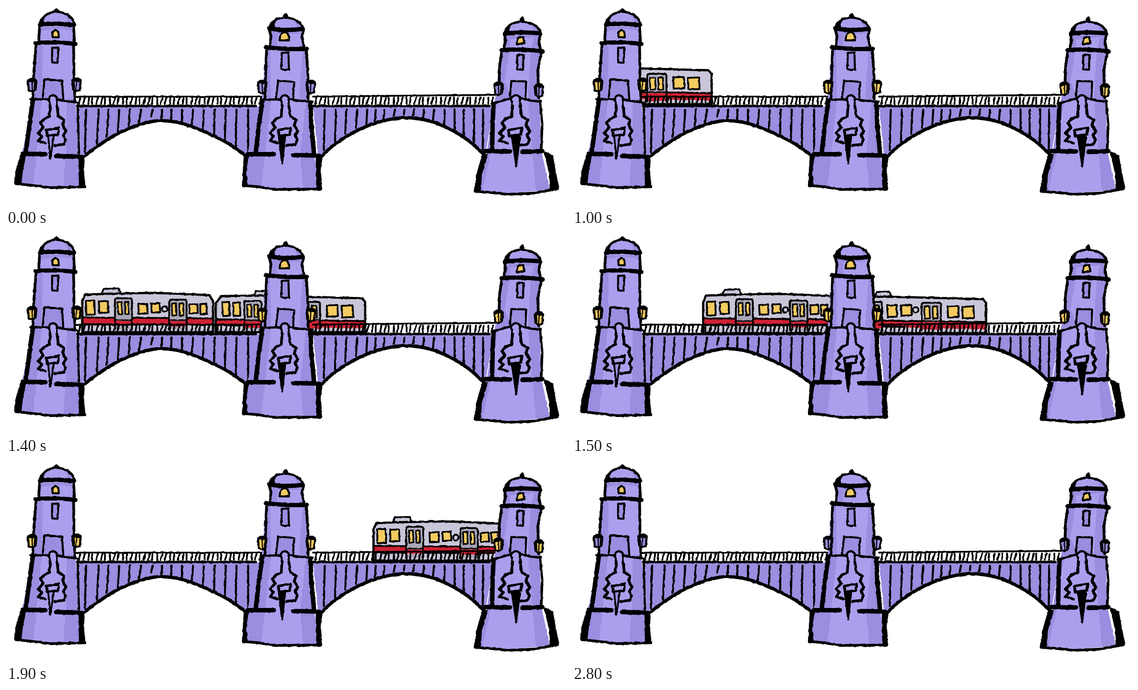
Write an HTML page that moves like this. It is 1251 px wide and 448 px high and loops after 3.4 s.

```html
<!DOCTYPE html>
<html lang="en">
<head>
<meta charset="utf-8">
<title>Train over a bridge</title>
<style>
html, body { margin: 0; width: 100%; height: 100%; overflow: hidden; background: #fff; }
svg { display: block; width: 100%; height: 100%; }
.ink { fill: none; stroke: #000; stroke-width: 5; stroke-linecap: round; stroke-linejoin: round; }
.train { animation: ride 3400ms step-end infinite; }
.glow { fill: #9b8ddf; animation: 3400ms step-end infinite; }
.t0 { animation-name: lamp0; }
.t1 { animation-name: lamp1; }
.t2 { animation-name: lamp2; }
@keyframes lamp0 { 5.88% { fill: #f4cb60; } 70.58% { fill: #9b8ddf; } }
@keyframes lamp1 { 11.76% { fill: #f4cb60; } 76.47% { fill: #9b8ddf; } }
@keyframes lamp2 { 17.64% { fill: #f4cb60; } 82.35% { fill: #9b8ddf; } }
@keyframes ride {
  0% { transform: translate(-1400px, 0); }
  29.41% { transform: translate(-613px, -2px); animation-timing-function: steps(5); }
  44.1% { transform: translate(0, -2px); }
  44.11% { transform: translate(0, 0); animation-timing-function: steps(2); }
  49.99% { transform: translate(278px, -2px); animation-timing-function: steps(4); }
  61.76% { transform: translate(778px, 0); }
  64.7%, 100% { transform: translate(1400px, 0); }
}
</style>
</head>
<body>
<svg viewBox="0 0 1251 448" preserveAspectRatio="none">
  <defs>
    <filter id="rough" filterUnits="userSpaceOnUse" x="0" y="0" width="1251" height="448" color-interpolation-filters="sRGB">
      <feTurbulence type="fractalNoise" baseFrequency=".11" numOctaves="2" seed="4"/>
      <feColorMatrix values="1 0 0 0 0  0 1 0 0 0  0 0 1 0 0  0 0 0 0 1" result="noise"/>
      <feDisplacementMap in="SourceGraphic" in2="noise" scale="3.5" xChannelSelector="R" yChannelSelector="G"/>
    </filter>
    <clipPath id="span"><path d="M110 100H1150V230H110Z"/></clipPath>
  </defs>
  <g filter="url(#rough)"><g clip-path="url(#span)"><g class="train" id="train"></g></g></g>
  <g filter="url(#rough)" id="bridge"></g>
</svg>
<script>
const LIGHT = '#ab9fed', DARK = '#9b8ddf', GOLD = '#f4cb60';
const GREY = '#cac6d9', DOOR = '#a9a5b6', RED = '#cf2134';

const fill = (d, color) => `<path d="${d}" fill="${color}"/>`;
const ink = (d, width = 5, color = 'none') =>
  `<path class="ink" d="${d}" style="stroke-width:${width};fill:${color}"/>`;
const box = (x1, y1, x2, y2, color, width = 4) =>
  ink(`M${x1} ${y1 + 1}L${x2 - 1} ${y1}L${x2} ${y2 - 1}L${x1 + 1} ${y2}Z`, width, color);

// ---- train ----
function door(x, y, width) {
  const mid = x + width / 2;
  return ink(`M${x} 216V${y + 5}Q${x} ${y} ${x + 5} ${y}H${x + width - 5}Q${x + width} ${y} ${x + width} ${y + 5}V216`, 4, DOOR)
    + fill(`M${x + 2} 197H${x + width - 2}V${y + 60}H${x + 2}Z`, RED)
    + ink(`M${x} 195H${x + width}`, 3)
    + box(x + 6, y + 8, mid - 3, y + 36, GOLD, 3.5)
    + box(mid + 3, y + 8, x + width - 7, y + 36, GOLD, 3.5);
}

function car({ outline, roofBox, stripe, lines, windows, doors, port }) {
  return ink(roofBox, 4, GREY) + fill(outline, GREY) + fill(stripe, RED)
    + ink(lines, 4) + ink(outline, 5)
    + doors.map(d => door(...d)).join('')
    + windows.map(w => box(...w, GOLD)).join('')
    + `<circle class="ink" cx="${port}" cy="170" r="6" style="stroke-width:4;fill:${GREY}"/>`;
}

document.getElementById('train').innerHTML = car({
  outline: 'M293 222V152L299 138L345 136L440 134L490 135L577 139L585 152V222Z',
  roofBox: 'M335 136L341 125L374 124L379 136Z',
  stripe: 'M294 190L584 192V204L294 202Z',
  lines: 'M294 189L584 191M294 204L584 205',
  windows: [[301, 151, 321, 183], [330, 152, 351, 179], [418, 158, 439, 181],
    [447, 157, 467, 178], [532, 159, 551, 180], [556, 158, 571, 182]],
  doors: [[366, 146, 38], [487, 149, 39]],
  port: 477
}) + car({
  outline: 'M591 222V157L604 141L680 140L770 142L918 146L925 154V222Z',
  roofBox: 'M676 140L681 130L708 129L714 139Z',
  stripe: 'M592 194L923 198V214L592 205Z',
  lines: 'M592 193L923 197M592 206L740 208',
  windows: [[606, 154, 622, 186], [630, 155, 646, 186], [704, 159, 726, 186],
    [735, 159, 759, 183], [839, 161, 864, 187], [872, 162, 898, 189]],
  doors: [[655, 152, 38], [781, 154, 43]],
  port: 768
});

// ---- spans between the towers ----
function railing(x1, x2, top1, top2) {
  let bars = '';
  for (let x = x1 + 6, i = 0; x < x2 - 3; i++) {
    const lean = 1.5 + 1.5 * Math.sin(i * 1.7);
    bars += `M${x + lean} 205L${x - lean / 2} 219`;
    x += 9.6 + 1.8 * Math.sin(i * 2.3);
  }
  return ink(`M${x1} ${top1}L${x2} ${top2}`, 4) + ink(bars, 4) + ink(`M${x1} 224H${x2 - 16}`, 5.5);
}

function girder(left, right, arch, bars) {
  return fill(`M${left} 225${arch.replace('M', 'L')}L${right} 225Z`, DARK) + ink(arch, 7.5)
    + ink(bars.map(([x, bottom, lean = 2]) => `M${x} 232L${x - lean} ${bottom}`).join(''), 4.5);
}

const spans =
  girder(160, 575, 'M168 342Q205 312 240 291Q285 266 330 258Q365 254 400 265Q445 280 490 304Q520 322 541 341',
    [[179, 328, 3], [207, 310, 4], [229, 292, 4], [253, 281, 3], [277, 268, 3], [302, 261, 5],
      [328, 247, 4], [349, 254], [370, 255, 1], [393, 258, 0], [418, 267, 3], [442, 275],
      [466, 286, 1], [491, 299], [515, 314], [541, 328, 0]])
  + girder(686, 1090, 'M698 346Q715 323 740 306Q785 274 830 261Q865 250 895 250Q930 252 955 260Q1000 277 1030 299Q1053 317 1070 335',
    [[712, 322], [737, 304], [760, 286], [784, 273], [807, 265], [826, 258], [846, 253, 3],
      [869, 246, 3], [890, 243, 1], [912, 245, 3], [934, 250], [956, 255], [980, 266, 1],
      [1002, 277, 0], [1023, 290, 1], [1046, 308, 1], [1066, 322, 1]])
  + railing(158, 574, 203, 203) + railing(686, 1096, 203, 199);

// ---- towers ----
const lamp = (x, y, side, tower) => `<g transform="translate(${x} ${y}) scale(${side} 1)">
  <path class="ink glow t${tower}" d="M-9 -10L-7 11L1 14L8 9L10 -11Z" style="stroke-width:4.5"/>
  ${ink('M0 -9L1 10M6 -8L5 7', 2.5)}${ink('M-9 -11L-3 -15L6 -14L10 -10L-8 -9Z', 4, '#000')}</g>`;

const statue = ink('M99 217L97 247L85 253L77 262L83 272L72 285L80 292L72 302L88 307'
    + 'M113 217L117 247L130 255L126 267L134 280L128 290L133 299L129 310L109 312', 6)
  + ink('M90 278L118 273L116 288L92 291Z', 5.5, LIGHT)
  + `<circle class="ink" cx="105" cy="209" r="9" style="fill:${LIGHT}"/>`
  + fill('M100 213H112V222H100Z', LIGHT);

function tower(t, index) {
  return fill(t.body, DARK) + fill(t.light, LIGHT)
    + ink(t.dome, 5, LIGHT) + fill(t.domeShade, DARK) + fill(t.domeInk, '#000')
    + ink(t.dome) + ink(t.spire, 4, '#000') + fill(t.eaves, DARK)
    + ink(t.edges, 6) + ink(t.bands, 9.5) + ink(t.arch, 4.5, GOLD)
    + ink(t.slot, 4.5, DARK) + ink(t.door, 4.5, DARK)
    + ink(t.ledge) + ink(t.heavy, 10) + ink(t.foot, 6) + fill(t.shadow, '#000')
    + `<g transform="${t.statue}">${statue}</g>` + ink(t.sword, 4, t.blade)
    + lamp(...t.lamps[0], 1, index) + lamp(...t.lamps[1], -1, index);
}

const towers = [{
  body: 'M75 45H150L153 84L155 215L168 335L175 404L100 406L22 397L36 332L60 208L66 86L73 80Z',
  light: 'M76 45H146L150 90V165L153 208H136L134 330L128 403L60 402L68 335L80 210L82 90Z',
  dome: 'M75 42C76 27 92 14 113 13C136 14 151 26 153 43Q112 36 75 42Z',
  domeShade: 'M127 17Q148 25 150 40L138 39Q138 25 127 17Z',
  domeInk: 'M75 40Q77 28 90 20L84 32L86 41Z',
  eaves: 'M76 47H150V56L112 50L76 57Z',
  spire: 'M108 13L110 9L113 7L117 11L118 14Z',
  edges: 'M75 47L73 80M151 47L153 80M67 89L62 150L60 205M151 90L152 165L154 211',
  bands: 'M76 42Q112 37 151 43M66 83Q110 79 155 85',
  arch: 'M105 70L104 60Q107 53 113 54Q118 57 118 70Z',
  slot: 'M103 94L117 93L115 128L103 126Z',
  door: 'M82 207L86 164L125 167L128 209',
  ledge: 'M54 209L95 209M115 209L134 213L158 216M160 217L163 330',
  heavy: 'M60 210L54 255L44 328M37 331L88 332M112 336L168 338',
  foot: 'M22 398L60 402L100 407L175 405',
  shadow: 'M32 332L45 333L38 368L34 401L18 397L20 374ZM162 338L176 340L174 370L178 408L163 406Z',
  statue: '', sword: 'M94 290L99 342L107 290Z', blade: DARK,
  lamps: [[58, 178], [158, 177]]
}, {
  body: 'M588 50H664L668 94L675 212L688 332L703 408L600 409L531 402L538 335L571 212L580 95L589 88Z',
  light: 'M606 54H660L663 94L655 207L670 215L657 335L664 408H570L578 340L592 212L590 98H606Z',
  dome: 'M589 49C590 34 606 26 625 26C646 27 661 40 664 50Q620 62 589 49Z',
  domeShade: 'M640 30Q660 40 661 49L650 51Q650 38 640 30Z',
  domeInk: 'M588 48Q590 34 607 28L600 40L602 53Z',
  eaves: 'M590 54L620 58L662 54V61L590 64Z',
  spire: 'M622 25L622 20L626 18L628 25Z',
  edges: 'M588 52L592 68L589 90M665 52L661 69L666 91M582 98L578 208M671 98L675 165V208',
  bands: 'M588 50Q625 57 663 51M580 92Q625 98 672 96',
  arch: 'M611 77L613 65Q618 57 626 59Q633 64 632 77Z',
  slot: 'M616 105L631 104L632 143L615 142Z',
  door: 'M603 206L608 167L644 170L641 207',
  ledge: 'M570 210L614 209M634 209L655 212L685 215',
  heavy: 'M573 212L565 265L558 328M680 216L682 265L688 330M541 332L598 332M642 334L699 335',
  foot: 'M530 402L565 405L600 411L703 410',
  shadow: 'M531 337L542 336L537 370L540 404L527 402ZM692 338L707 341L703 366L707 409L693 411Z',
  statue: 'translate(518)', sword: 'M609 290L617 353L624 290Z', blade: '#000',
  lamps: [[572, 182], [681, 182]]
}, {
  body: 'M1114 60H1194L1193 98L1192 205L1196 325L1215 411L1120 420L1055 414L1073 332L1092 217L1105 102L1113 92Z',
  light: 'M1128 62H1180L1172 105L1166 206L1176 325L1184 414L1120 420L1064 414L1082 332L1098 217L1130 207L1114 170L1124 105Z',
  dome: 'M1114 61C1116 45 1132 35 1155 35C1178 37 1191 48 1194 60Q1152 54 1114 61Z',
  domeShade: 'M1170 39Q1188 46 1191 57L1177 56Q1180 47 1170 39Z',
  domeInk: 'M1114 59Q1117 45 1131 38L1124 50L1126 60Z',
  eaves: 'M1115 67L1192 63V69L1115 76Z',
  spire: 'M1150 34L1150 28L1154 25L1157 34Z',
  edges: 'M1114 66L1116 78L1112 94M1195 62L1190 78L1194 97M1107 105L1102 140V170M1195 107L1188 145L1190 206',
  bands: 'M1115 62Q1150 57 1192 61M1107 99Q1150 95 1199 102',
  arch: 'M1140 86L1143 73Q1149 67 1155 70L1158 83Z',
  slot: 'M1142 110L1156 109L1155 143L1142 142Z',
  door: 'M1126 202L1129 168L1162 169L1160 207',
  ledge: 'M1092 217L1130 206M1150 206L1172 212L1195 214M1193 212L1198 265L1196 325',
  heavy: 'M1089 219L1087 265L1086 323M1071 325L1126 326M1154 327L1198 325',
  foot: 'M1048 415L1085 418L1120 422L1180 419L1232 409',
  shadow: 'M1064 331L1077 332L1063 378L1061 417L1045 415L1050 380ZM1201 324L1222 335L1229 375L1236 407L1216 413L1213 375Z',
  statue: 'translate(1023 0) scale(1.1 1)', sword: 'M1130 293L1140 359L1148 293Z', blade: '#000',
  lamps: [[1100, 186], [1191, 190]]
}];

document.getElementById('bridge').innerHTML = spans + towers.map(tower).join('');
</script>
</body>
</html>
```
